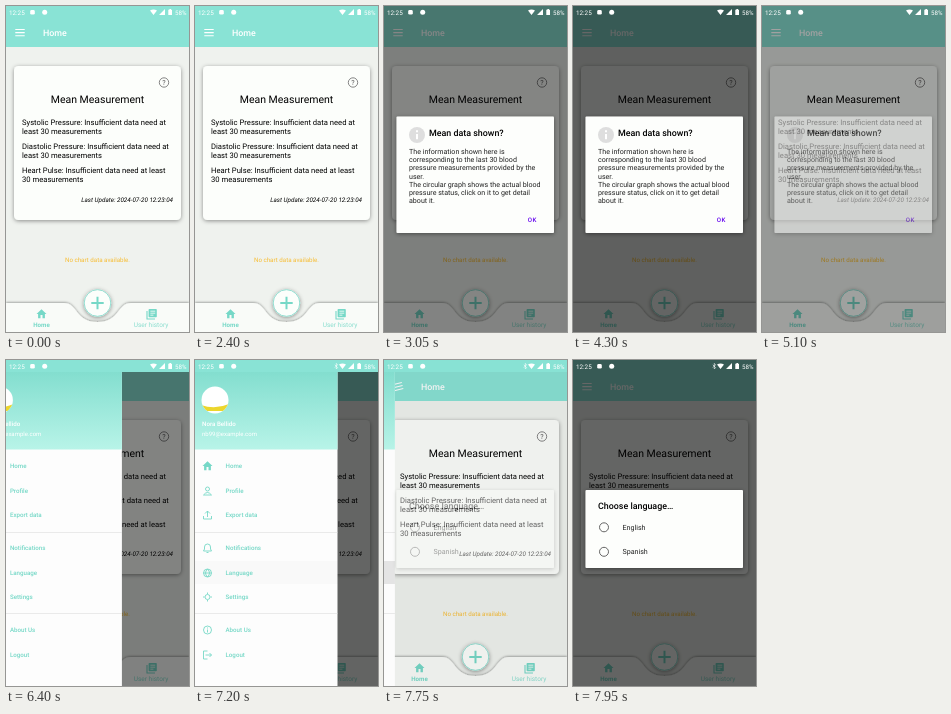
Recreate the animation shown at these times as an HTML page. Size 183 by 326 pixels, loop 8000 ms.

```html
<!DOCTYPE html>
<html lang="en">
<head>
<meta charset="utf-8">
<title>Blood pressure app</title>
<style>
  html, body { margin: 0; width: 100%; height: 100%; overflow: hidden; background: #eff2ee; }
  svg { display: block; width: 100%; height: 100%; }
  text { font-family: Roboto, sans-serif; text-rendering: geometricPrecision; }
  .teal { fill: #76d8c7; }
  .line { fill: none; stroke: #76d8c7; }
  .title { font-size: 8.9px; font-weight: 500; }
  .body { font-size: 7.65px; }
  .small { font-size: 6.2px; }
  .option { font-size: 7.1px; fill: #222; }
  .medium { font-weight: 500; }
  .middle { text-anchor: middle; }
</style>
</head>
<body>
<svg viewBox="0 0 183 326" preserveAspectRatio="none">
  <defs>
    <linearGradient id="headerFill" x2="0" y2="1">
      <stop stop-color="#83decf"/><stop offset="1" stop-color="#b8f4e8"/>
    </linearGradient>
    <filter id="shadow" x="-20%" y="-20%" width="140%" height="140%">
      <feDropShadow dx="0" dy="1" stdDeviation="1.9" flood-opacity=".42"/>
    </filter>
    <filter id="barShadow" x="-10%" y="-30%" width="120%" height="160%">
      <feDropShadow dx="0" dy="-.6" stdDeviation="1" flood-opacity=".4"/>
    </filter>
    <clipPath id="avatarClip"><circle cx="20" cy="40" r="13.5"/></clipPath>
    <path id="house" d="M0-4.8L-5 0H-3.4V4.3H-1V1H1V4.3H3.4V0H5Z"/>
  </defs>

  <rect width="183" height="326" fill="#eff2ee"/>
  <rect width="183" height="41" fill="#89e3d5"/>
  <path id="menu" d="M9.3 23.5h9.4M9.3 26.6h9.4M9.3 29.7h9.4" stroke="#fff" stroke-width="1.1"/>
  <text class="title" x="37" y="30" fill="#fff">Home</text>

  <rect x="8" y="60" width="167" height="154" rx="4.5" fill="#fcfefb" filter="url(#shadow)"/>
  <circle cx="158" cy="76.5" r="4.7" fill="none" stroke="#777" stroke-width=".9"/>
  <text class="middle medium" x="158" y="79.1" font-size="7" fill="#777">?</text>
  <text class="middle" x="91.5" y="97" font-size="10.5">Mean Measurement</text>
  <g id="readings"></g>
  <text x="167" y="196" font-size="6.3" font-style="italic" text-anchor="end">Last Update: 2024-07-20 12:23:04</text>
  <text class="small middle" x="91.5" y="256" fill="#f7bd33">No chart data available.</text>

  <path d="M0 297H58C72 297 69 316 91.5 316S111 297 125 297H183V330H0Z" fill="#f9fbf8" filter="url(#barShadow)"/>
  <circle cx="91.5" cy="297" r="13.3" fill="#fcfefb" stroke="#94dfd2" filter="url(#shadow)"/>
  <path class="line" d="M85.3 297h12.4M91.5 290.8v12.4" stroke-width="2"/>
  <use href="#house" class="teal" x="35.5" y="308"/>
  <text class="small teal middle" x="35.5" y="321" font-weight="700">Home</text>
  <path class="line" d="M141 305V313H149" stroke-width="1.1"/>
  <rect class="teal" x="142.6" y="303" width="8.2" height="8.3" rx=".8"/>
  <path d="M144.4 305.2h4.8M144.4 307.2h4.8M144.4 309.2h3" stroke="#fcfefb" stroke-width=".8"/>
  <text class="teal middle" x="145" y="321" font-size="6.5" opacity=".85">User history</text>

  <rect id="scrim" y="12" width="183" height="314" opacity="0"/>
  <g id="drawer">
    <rect y="12" width="142.5" height="314" fill="#fdfdfd"/>
    <rect y="12" width="142.5" height="77.5" fill="url(#headerFill)"/>
    <g clip-path="url(#avatarClip)">
      <rect x="6" y="26" width="28" height="28" fill="#fff"/>
      <path d="M6 45Q20 50 34 44V51H6Z" fill="#ecd62c"/>
    </g>
    <g fill="#fff">
      <text class="small medium" x="7" y="66.3">Nora Bellido</text>
      <text x="7" y="76.3" font-size="6">nb99@example.com</text>
    </g>
    <rect id="pressed" y="201" width="142.5" height="23" opacity="0"/>
    <path d="M0 172.5H142.5M0 253.5H142.5" stroke="#ddd" stroke-width=".6"/>
    <g id="items"></g>
  </g>

  <rect id="dim" width="183" height="326" opacity="0"/>
  <g fill="#fff">
    <text x="3" y="8.5" font-size="6.3">12:25</text>
    <rect x="24.2" y="4" width="4.6" height="4.6" rx="1.4"/>
    <circle cx="38.7" cy="6.3" r="2.5"/>
    <path id="bluetooth" d="M139.8 4.8l2.8 2.8-1.3 1.4V3.4l1.3 1.4-2.8 2.8" fill="none" stroke="#fff" stroke-width=".6"/>
    <path d="M144 4.6Q147.5 2.2 151 4.6L147.5 9ZM153 9H159V3ZM162.3 3.8H163.4V3H165V3.8H166V9H162.3Z"/>
    <text x="169" y="8.5" font-size="6.2">58%</text>
  </g>

  <g id="info">
    <rect x="12.5" y="110.5" width="157.5" height="116.5" rx="1" fill="#fdfefc" filter="url(#shadow)"/>
    <circle cx="33" cy="129" r="8" fill="#dedede"/>
    <path d="M33 128v5.2M33 124.2v2" stroke="#fff" stroke-width="2"/>
    <text class="title" x="45" y="130">Mean data shown?</text>
    <g id="infoLines"></g>
    <text class="small medium" x="143.7" y="215.6" fill="#6200ee" letter-spacing=".5">OK</text>
  </g>

  <g id="language">
    <rect x="12.5" y="130" width="157.5" height="78" rx="1" fill="#fdfefc" filter="url(#shadow)"/>
    <text class="title" x="25" y="148.7">Choose language…</text>
    <g fill="none" stroke="#666"><circle cx="31" cy="167.3" r="4.5"/><circle cx="31" cy="191.8" r="4.5"/></g>
    <text class="option" x="49.5" y="169.9">English</text>
    <text class="option" x="49.5" y="194.4">Spanish</text>
  </g>
</svg>
<script>
const $ = id => document.getElementById(id);

$('readings').innerHTML = [
  ['Systolic Pressure: Insufficient data need at', 'least 30 measurements'],
  ['Diastolic Pressure: Insufficient data need at', 'least 30 measurements'],
  ['Heart Pulse: Insufficient data need at least', '30 measurements']
].map(([first, second], i) => {
  const y = 119 + i * 24;
  return `<text class="body" x="16" y="${y}">${first}</text>
    <text class="body" x="16" y="${y + 9.2}">${second}</text>`;
}).join('');

$('infoLines').innerHTML = [
  'The information shown here is', 'corresponding to the last 30 blood',
  'pressure measurements provided by the', 'user.',
  'The circular graph shows the actual blood', 'pressure status, click on it to get detail',
  'about it.'
].map((line, i) => `<text class="option" x="25" y="${148 + i * 8.2}">${line}</text>`).join('');

// Drawer entries: label, centre height, icon strokes around the origin
$('items').innerHTML = [
  ['Home', 106, ''],
  ['Profile', 131, 'M-2-2a2 2 0 1 0 4 0a2 2 0 1 0-4 0M-4 4Q0-1 4 4Z'],
  ['Export data', 155, 'M0 2V-4M-2.5-1.5L0-4L2.5-1.5M-4 1V4H4V1'],
  ['Notifications', 188, 'M-4 3H4L3 1V-1Q3-4 0-4T-3-1V1ZM-1 4.5H1'],
  ['Language', 213, 'M-4 0a4 4 0 1 0 8 0a4 4 0 1 0-8 0H4M0-4Q-4 0 0 4Q4 0 0-4'],
  ['Settings', 237, 'M-2.5 0a2.5 2.5 0 1 0 5 0a2.5 2.5 0 1 0-5 0M0-4.5V-3M0 3V4.5M-4.5 0H-3M3 0H4.5'],
  ['About Us', 270, 'M-4 0a4 4 0 1 0 8 0a4 4 0 1 0-8 0M0-.5V2.5M0-2.5V-1.5'],
  ['Logout', 295, 'M0-4H-4V4H0M-2 0H4M2-2L4 0L2 2']
].map(([label, y, icon]) => `<g transform="translate(12.5 ${y})">` +
  (icon ? `<path class="line" d="${icon}" stroke-width=".9"/>` : '<use href="#house" class="teal"/>') +
  `<text class="small medium teal" x="18" y="2.3">${label}</text></g>`).join('');

const clamp = v => Math.min(1, Math.max(0, v));
const ramp = (t, start, length) => clamp((t - start) / length);
const easeOut = (p, power) => 1 - (1 - p) ** power;

// Fades a dialog in and out; returns how dark the screen behind it is.
function showDialog(id, t, open, close) {
  $(id).setAttribute('opacity', ramp(t, open, 130) * (1 - ramp(t, close, 150)));
  return 0.6 * ramp(t, open + 50, 190) * (1 - ramp(t, close, 184));
}

function draw(now) {
  const t = now % 8000;
  const closing = t > 7545;
  const slide = closing
    ? 1 - easeOut(ramp(t, 7545, 512), 5)
    : easeOut(ramp(t, 6255, 512), 5);
  $('drawer').setAttribute('transform', `translate(${142.5 * (slide - 1)} 0)`);
  $('scrim').setAttribute('opacity', 0.6 * slide);
  $('menu').setAttribute('transform', `rotate(${180 * slide * (closing ? -1 : 1)} 14 26.6)`);
  $('pressed').setAttribute('opacity', 0.12 * ramp(t, 7180, 180) * (1 - ramp(t, 7700, 250)));
  $('bluetooth').setAttribute('opacity', t >= 7200 ? 1 : 0);
  const dim = showDialog('info', t, 2850, 5030) + showDialog('language', t, 7700, 9000);
  $('dim').setAttribute('opacity', dim);
}

const began = performance.now();
function tick() {
  draw(performance.now() - began);
  requestAnimationFrame(tick);
}
tick();
</script>
</body>
</html>
```
